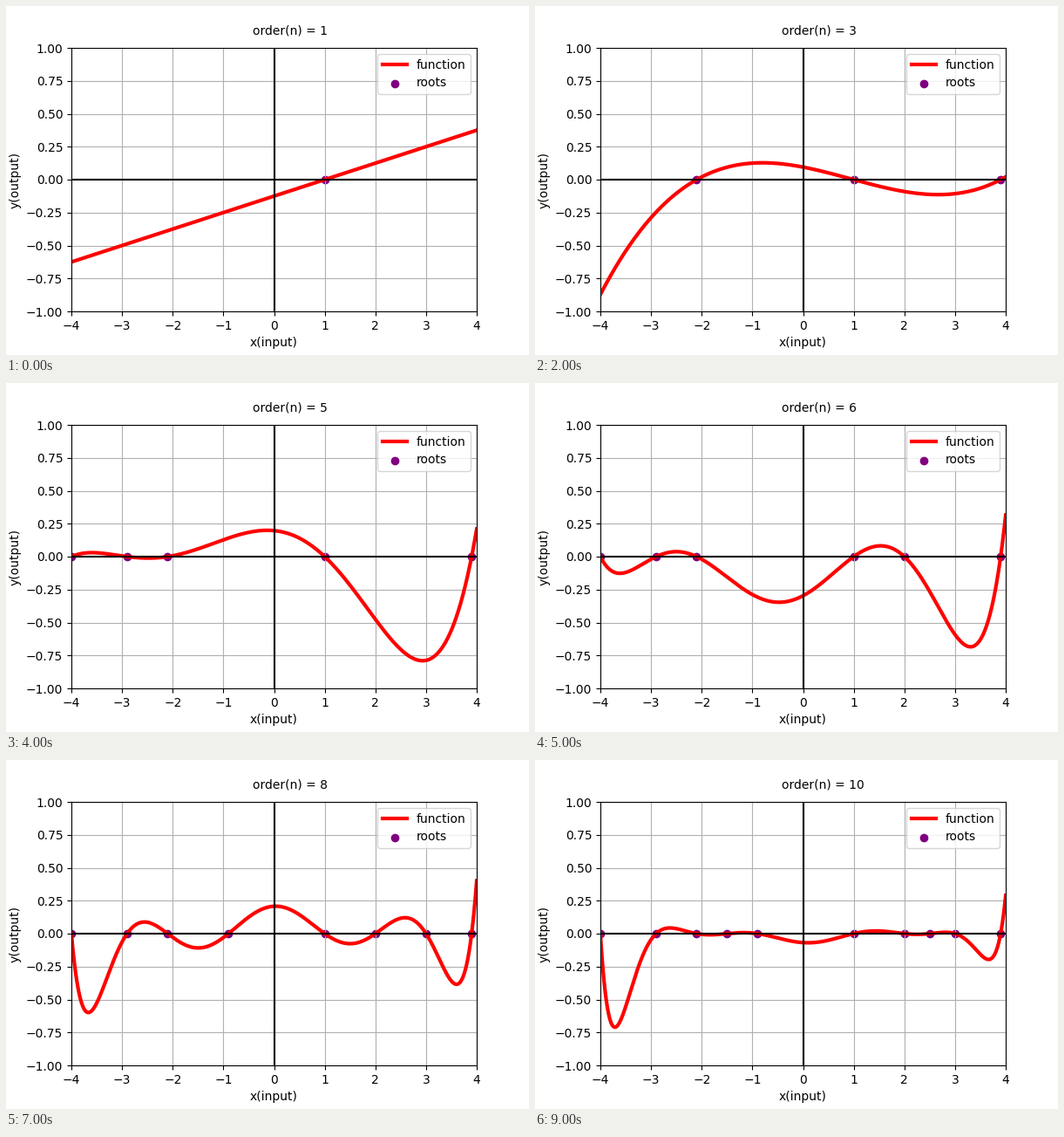
Animation of 600 by 400 pixels, one loop 10 s. Source, as a matplotlib script:

```python
import numpy as np
import matplotlib.pyplot as plt
from matplotlib.animation import FuncAnimation

ROOTS = [1, -2.1, 3.9, -4, -2.9, 2, -0.9, 3, -1.5, 2.5]
X = np.linspace(-4, 4, 1000)

plt.rcParams["font.family"] = "DejaVu Sans"
fig, ax = plt.subplots(figsize=(6, 4), dpi=100)
fig.subplots_adjust(left=0.125, right=0.9, bottom=0.125, top=0.88)

curve, = ax.plot([], [], color="red", lw=3, label="function")
dots = ax.scatter([], [], color="purple", label="roots")
ax.axhline(0, color="black")
ax.axvline(0, color="black")
title = ax.text(283 / 600, 367 / 400, "", transform=fig.transFigure)

ax.set(xlim=(-4, 4), ylim=(-1, 1), xlabel="x(input)", ylabel="y(output)")
ax.grid(True)
ax.legend(loc="best")


def polynomial(roots):
    """Product of (x - root), scaled so its values span exactly one unit."""
    y = np.prod([X - r for r in roots], axis=0)
    return y / np.ptp(y)


def update(i):
    order = i + 1
    roots = ROOTS[:order]
    curve.set_data(X, polynomial(roots))
    dots.set_offsets([(r, 0) for r in roots])
    title.set_text(f"order(n) = {order}")
    return curve, dots, title


anim = FuncAnimation(fig, update, frames=len(ROOTS), interval=1000,
                     init_func=lambda: update(0), repeat=True, repeat_delay=0)
plt.show()
```
